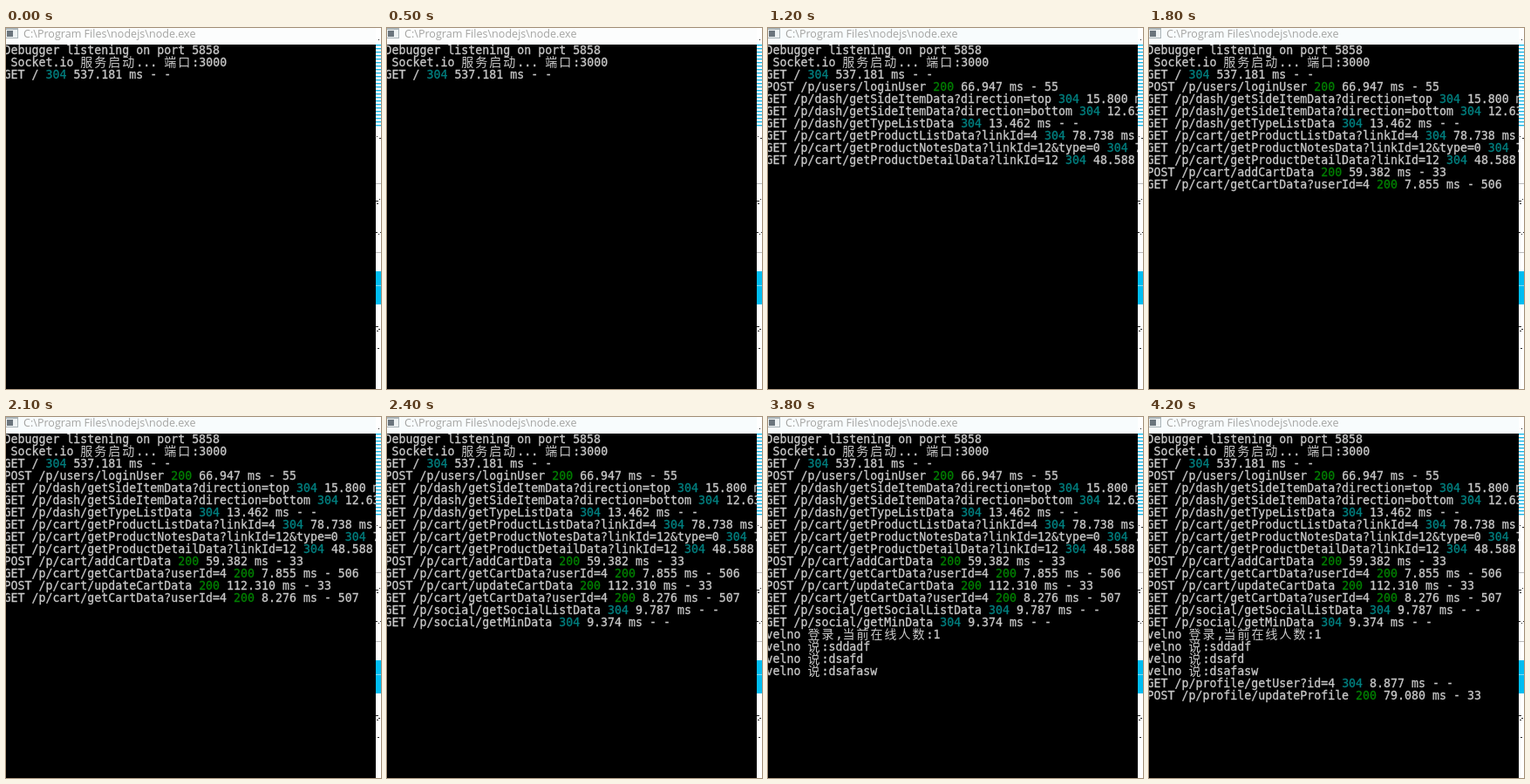
Recreate the animation shown at these times as an HTML page. Size 430 by 414 pixels, loop 5000 ms.

```html
<!DOCTYPE html>
<html lang="zh">
<head>
<meta charset="utf-8">
<style>
  html, body { margin: 0; width: 100%; height: 100%; overflow: hidden; background: #fff; }
  #title {
    position: absolute; left: 0; top: 0; width: 424px; height: 19px;
    background: #f8fcfd; color: #a4a4a2;
    font: 12.57px/13px "Open Sans", sans-serif; white-space: pre;
  }
  #title.idle { background: #fcfdfd; }
  #title span { position: absolute; left: 20px; top: 0; }
  #title svg { position: absolute; left: 0; top: 0; }
  #console {
    position: absolute; left: 0; top: 19px; width: 424px; height: 395px;
    overflow: hidden; background: #000; color: #c8c8c8;
    font: 13.288px/14px "DejaVu Sans Mono", monospace;
    -webkit-text-stroke: .3px;
  }
  #console div { position: absolute; left: -2.5px; height: 14px; white-space: pre; }
  .s304 { color: #008080; }
  .s200 { color: #008000; }
  .cjk {
    font: 14px/0 "Noto Sans CJK SC", "Noto Sans CJK", sans-serif;
    letter-spacing: 2px; -webkit-text-stroke: 0;
  }
  #edge { position: absolute; left: 424px; top: 0; }
</style>
</head>
<body>
<div id="title">
  <svg width="15" height="13">
    <path fill="#aab4b8" d="M0 0h14v12H0z"/>
    <path fill="#eef2f3" d="M0 2h13v9H0z"/>
    <path fill="#6b757d" d="M1 3h7v7H1z"/>
  </svg>
  <span>C:\Program Files\nodejs\node.exe</span>
</div>
<div id="console"></div>
<svg id="edge" width="6" height="414" shape-rendering="crispEdges">
  <defs>
    <pattern id="rules" width="6" height="4" y="19" patternUnits="userSpaceOnUse">
      <path fill="#12b7ea" d="M0 0h6v1H0z"/>
      <path fill="#a5e4f7" d="M0 1h6v1H0z"/>
    </pattern>
  </defs>
  <path fill="url(#rules)" d="M0 19h6v96H0z"/>
  <path fill="#bbb" d="M0 178h6v1H0zM0 257h6v1H0z"/>
  <path fill="#00bdf2" d="M0 279h6v38H0z"/>
  <path fill="#7fdcf7" d="M0 295h6v1H0z"/>
  <path fill="#222" d="M3 13h1v1h-1zM1 124h1v1h-1zM4 126h2v1h-2zM0 198h3v1H0zM4 196h1v1h-1zM1 201h2v1H1zM0 234h2v1H0zM3 236h1v1h-1zM5 234h1v1h-1zM0 342h3v1H0zM3 345h2v1H3zM1 347h2v1H1zM2 367h2v1H2z"/>
</svg>
<script>
const LOOP = 5000, ROW = 14;
const log = [
  [0, 'Debugger listening on port 5858'],
  [0, ' Socket.io 服务启动... 端口:3000'],
  [0, 'GET / 304 537.181 ms - -'],
  [900, 'POST /p/users/loginUser 200 66.947 ms - 55'],
  [900, 'GET /p/dash/getSideItemData?direction=top 304 15.800 ms - -'],
  [900, 'GET /p/dash/getSideItemData?direction=bottom 304 12.631 ms - -'],
  [900, 'GET /p/dash/getTypeListData 304 13.462 ms - -'],
  [1000, 'GET /p/cart/getProductListData?linkId=4 304 78.738 ms - -'],
  [1100, 'GET /p/cart/getProductNotesData?linkId=12&type=0 304 7.931 ms - -'],
  [1200, 'GET /p/cart/getProductDetailData?linkId=12 304 48.588 ms - -'],
  [1400, 'POST /p/cart/addCartData 200 59.382 ms - 33'],
  [1500, 'GET /p/cart/getCartData?userId=4 200 7.855 ms - 506'],
  [1900, 'POST /p/cart/updateCartData 200 112.310 ms - 33'],
  [2000, 'GET /p/cart/getCartData?userId=4 200 8.276 ms - 507'],
  [2300, 'GET /p/social/getSocialListData 304 9.787 ms - -'],
  [2400, 'GET /p/social/getMinData 304 9.374 ms - -'],
  [2800, 'velno 登录,当前在线人数:1'],
  [3300, 'velno 说:sddadf'],
  [3500, 'velno 说:dsafd'],
  [3800, 'velno 说:dsafasw'],
  [3900, 'GET /p/profile/getUser?id=4 304 8.877 ms - -'],
  [4200, 'POST /p/profile/updateProfile 200 79.080 ms - 33'],
];

const title = document.getElementById('title');
const screen = document.getElementById('console');

const markUp = text => text
  .replace(/&/g, '&amp;')
  .replace(/ (304|200) /, ' <span class="s$1">$1</span> ')
  .replace(/[\u4e00-\u9fff]+/g, '<span class="cjk">$&</span>');

const rows = log.map(([start, text], i) => {
  const el = document.createElement('div');
  el.style.top = i * ROW + 'px';
  el.innerHTML = markUp(text);
  screen.append(el);
  return { start, el };
});

function draw() {
  const t = performance.now() % LOOP;
  title.className = t < 900 ? 'idle' : '';
  for (const { start, el } of rows) el.hidden = t < start;
  requestAnimationFrame(draw);
}
draw();
</script>
</body>
</html>
```
